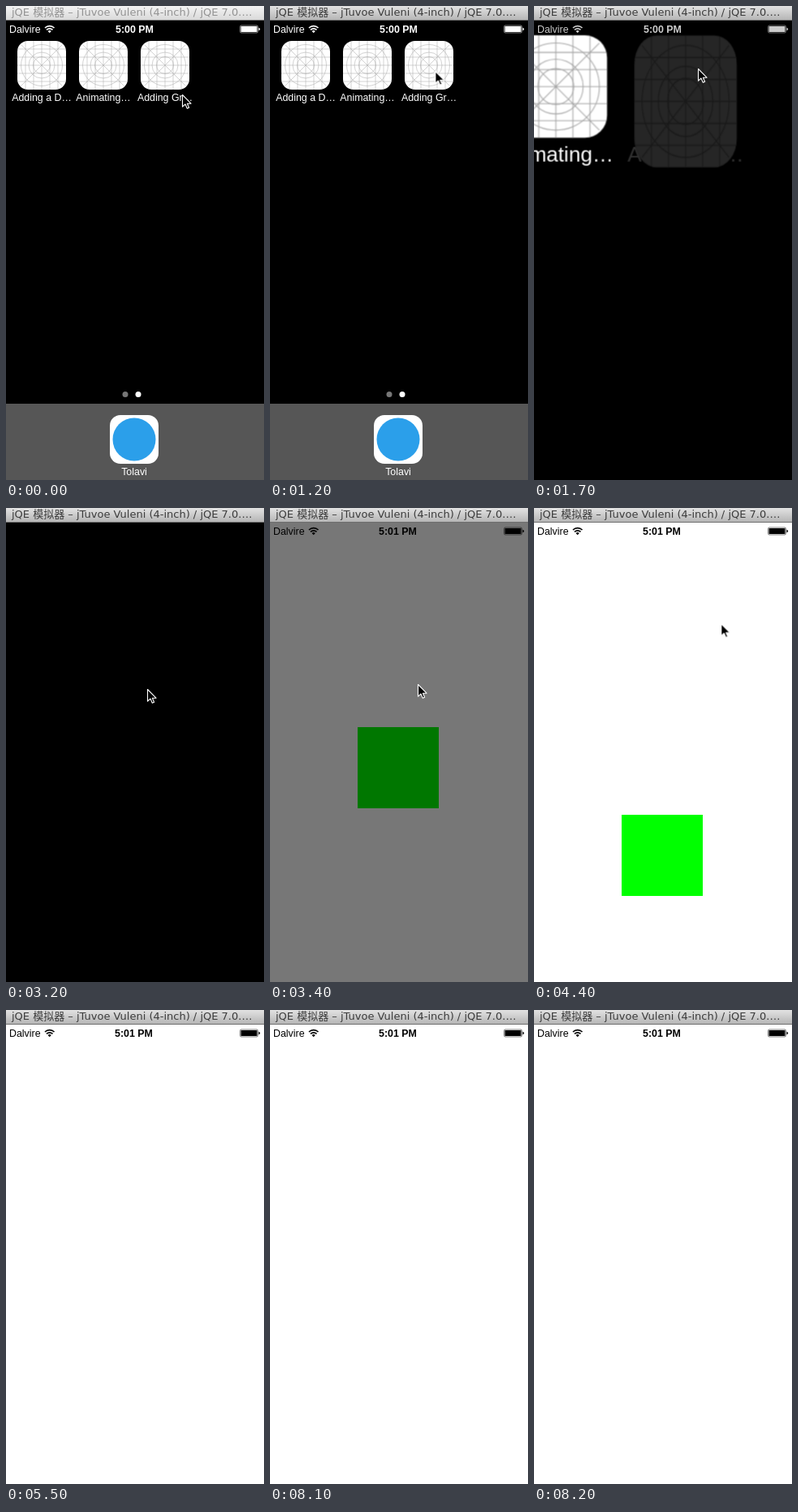
An HTML page for the animation above (8.8 s loop, 318 px wide and 584 px high).

```html
<!DOCTYPE html>
<html lang="zh">
<head>
<meta charset="utf-8">
<title>Simulator</title>
<style>
html, body { margin: 0; width: 100%; height: 100%; overflow: hidden; background: #000; }
svg { display: block; }
text { font: 12.4px "Liberation Sans", Arial, sans-serif; }
.mid { text-anchor: middle; }
.bold { font-weight: bold; }
.title { font: 13px "DejaVu Sans", "Noto Sans CJK SC", sans-serif; animation: title-ink 8.8s step-end infinite; }
.idle { animation: idle 8.8s step-end infinite; }
.home { animation: zoom 8.8s linear infinite; }
.stretch { transform-origin: 0 43px; animation: stretch 8.8s linear infinite, dim 8.8s linear infinite; }
.tag { animation: tag 8.8s linear infinite; }
.light { color: #fff; animation: light 8.8s linear infinite; }
.app { animation: app 8.8s step-end infinite; }
.paper { animation: paper 8.8s linear infinite; }
.box { animation: fall 8.8s linear infinite, green 8.8s linear infinite; }
.cursor { animation: cursor 8.8s linear infinite; }

@keyframes title-ink { 0% { fill: #939393; } 4.545%, 100% { fill: #3c3c3c; } }
@keyframes idle { 0% { opacity: 1; } 4.545%, 100% { opacity: 0; } }
@keyframes zoom {
  0% { transform: translate(0, 0) scale(1); opacity: 1; }
  17.12% { transform: translate(0, 0) scale(1); opacity: 1; animation-timing-function: ease-in-out; }
  23.409% { transform: translate(-885.3px, -213.3px) scale(5.333); opacity: 1; }
  23.42%, 100% { transform: translate(-885.3px, -213.3px) scale(5.333); opacity: 0; }
}
@keyframes stretch {
  0%, 17.12% { transform: scaleY(1); }
  23.409%, 100% { transform: scaleY(1.82); }
}
@keyframes dim {
  0%, 14.76% { filter: brightness(1); }
  14.773%, 17.159% { filter: brightness(.5); }
  19.318% { filter: brightness(.15); }
  20.455%, 100% { filter: brightness(0); }
}
@keyframes tag { 0%, 17.159% { opacity: 1; } 19.318% { opacity: .2; } 20.455%, 100% { opacity: 0; } }
@keyframes light { 0%, 18.182% { opacity: 1; } 19.318% { opacity: .8; } 22.727%, 100% { opacity: 0; } }
@keyframes app { 0% { visibility: hidden; } 36.364%, 100% { visibility: visible; } }
@keyframes paper {
  0%, 36.364% { fill: #000; }
  38.636% { fill: #777; animation-timing-function: ease-out; }
  43.182% { fill: #ebebeb; }
  45.455%, 100% { fill: #fff; }
}
@keyframes green {
  0%, 36.364% { fill: #000; }
  38.636% { fill: #070; animation-timing-function: ease-out; }
  43.182% { fill: #00fa00; }
  45.455%, 100% { fill: #0f0; }
}
/* the curve is an exact t squared: constant gravity */
@keyframes fall {
  0%, 31.216% { transform: translateY(0); animation-timing-function: cubic-bezier(.3333, 0, .6667, .3333); }
  62.5%, 100% { transform: translateY(355px); }
}
@keyframes cursor {
  0%, 1.136% { transform: translate(217px, 109px); }
  6.818%, 11.364% { transform: translate(206px, 86px); }
  14.773%, 20.455% { transform: translate(202px, 77px); animation-timing-function: ease-in-out; }
  28.409% { transform: translate(190px, 268px); }
  31.818%, 36.364% { transform: translate(174px, 223px); }
  38.636% { transform: translate(182px, 217px); }
  43.182% { transform: translate(203px, 205px); }
  55.682% { transform: translate(253px, 90px); }
  61.364%, 100% { transform: translate(282px, -26px); }
}
</style>
</head>
<body>
<svg width="318" height="584" viewBox="0 0 318 584">
  <defs>
    <linearGradient id="bar-on" x2="0" y2="1"><stop stop-color="#e2e2e2"/><stop offset="1" stop-color="#b6b6b6"/></linearGradient>
    <linearGradient id="bar-off" x2="0" y2="1"><stop stop-color="#f3f3f3"/><stop offset="1" stop-color="#dadada"/></linearGradient>
    <g id="grid">
      <rect width="60" height="60" rx="13" fill="#fff"/>
      <g transform="scale(.5)" fill="none" stroke="#a4a4a4">
        <path d="M20 1V119M40 0V120M60 0V120M80 0V120M100 1V119M1 20H119M0 40H120M0 60H120M0 80H120M1 100H119M9 9L111 111M111 9L9 111"/>
        <circle cx="60" cy="60" r="51"/>
        <circle cx="60" cy="60" r="32"/>
        <circle cx="60" cy="60" r="21"/>
      </g>
    </g>
    <g id="status" fill="currentColor">
      <text x="4" y="32.5">Dalvire</text>
      <path d="M48 27a8.2 8.2 0 0 1 11.5 0M50 29.4a5.3 5.3 0 0 1 7.5 0" fill="none" stroke="currentColor" stroke-width="1.6"/>
      <path d="M51.6 31a3.1 3.1 0 0 1 4.2 0l-2.1 2.2z"/>
      <rect x="288.5" y="24" width="22" height="9" rx="1.5" fill="none" stroke="currentColor" stroke-width=".8" opacity=".65"/>
      <rect x="289.5" y="25" width="20" height="7" rx=".6"/>
      <path d="M311.5 26.7q1.6 .3 1.6 1.8t-1.6 1.8z"/>
    </g>
  </defs>

  <rect width="318" height="584"/>

  <g class="home">
    <rect y="490" width="318" height="94" fill="#565656"/>
    <circle cx="147" cy="478.5" r="3.5" fill="#777"/>
    <circle cx="163" cy="478.5" r="3.5" fill="#fff"/>
    <rect x="128" y="504" width="60" height="60" rx="13" fill="#fff"/>
    <circle cx="158" cy="534" r="26.5" fill="#2b9fea"/>
    <g class="mid" fill="#fff">
      <text x="158" y="578">Tolavi</text>
      <text x="44" y="117">Adding a D…</text>
      <text x="120" y="117">Animating…</text>
      <text class="tag" x="196" y="117">Adding Gr…</text>
    </g>
    <use href="#grid" x="14" y="43"/>
    <use href="#grid" x="90" y="43"/>
    <g class="stretch"><use href="#grid" x="166" y="43"/></g>
  </g>

  <g class="light">
    <use href="#status"/>
    <text class="mid bold" x="158.5" y="32.5" fill="#fff">5:00 PM</text>
  </g>

  <g class="app">
    <rect class="paper" y="17" width="318" height="567"/>
    <rect class="box" x="108" y="250" width="100" height="100"/>
    <g color="#000">
      <use href="#status"/>
      <text class="mid bold" x="157.5" y="32.5">5:01 PM</text>
    </g>
  </g>

  <rect width="318" height="17" fill="url(#bar-on)"/>
  <rect class="idle" width="318" height="17" fill="url(#bar-off)"/>
  <rect y="17" width="318" height="1" fill="#6e6e6e"/>
  <text class="title" x="7" y="12">jQE 模拟器 – jTuvoe Vuleni (4-inch) / jQE 7.0.…</text>

  <path class="cursor" d="M.5 .5V15.2L4 12L6.3 17.2L8.6 16.2L6.4 11.2H11z" stroke="#fff" stroke-width="1.1" stroke-linejoin="round"/>
</svg>
<script>
const LOOP = 8800, STEP = 100;
const anims = document.getAnimations();
anims.forEach(a => a.pause());

function tick() {
  const t = Math.floor(performance.now() % LOOP / STEP) * STEP;
  anims.forEach(a => { a.currentTime = t; });
  requestAnimationFrame(tick);
}
tick();
</script>
</body>
</html>
```
